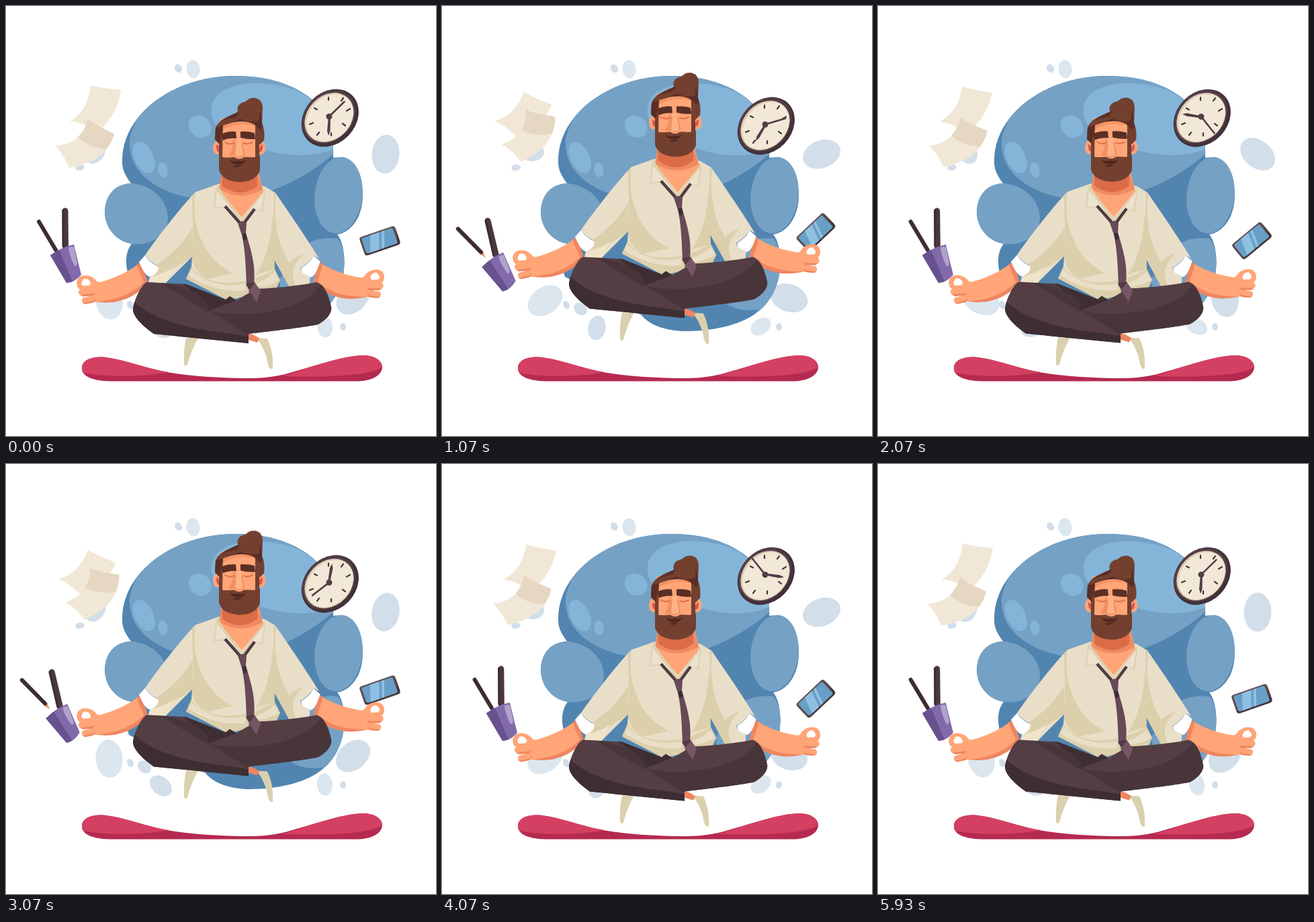
Animation of 640x640 px, one loop 6 s. Source, as an HTML page:

```html
<!DOCTYPE html>
<html lang="en">
<head>
<meta charset="utf-8">
<title>Calm at work</title>
<style>
  html, body { margin: 0; width: 100%; height: 100%; overflow: hidden; background: #fff; }
  svg { display: block; width: 100%; height: 100%; }
</style>
</head>
<body>
<svg viewBox="0 0 640 640">
  <defs>
    <clipPath id="domeClip"><path d="M173 232C172 160 250 104 342 104C400 104 445 123 470 154C483 171 488 192 487 226L440 300L200 300Z"/></clipPath>
    <path id="pants" d="M209 411C199 418 190 440 189 452C190 464 206 478 220 488L361 502L361 488C400 483 440 479 464 474C477 468 486 456 484 448C481 432 474 414 462 411C440 416 400 420 372 421L343 438L333 432L327 437L268 414Z"/>
    <clipPath id="pantsClip"><use href="#pants"/></clipPath>
    <g id="arm">
      <path fill="#ffa577" d="M201 380C188 393 163 405 140 411C130 410 125 419 130 428L128 440C150 443 182 439 210 411Z"/>
      <path fill="#ef8560" d="M201 380L195 385C197 396 203 404 205 411C191 426 168 438 134 440C160 445 192 437 211 411Z"/>
      <path fill="none" stroke="#ffa577" stroke-width="7" stroke-linecap="round" d="M132 412C128 405 118 403 112 406C107 410 108 418 114 420C121 420 127 418 131 416"/>
      <path fill="#ffa577" d="M124 404Q137 408 143 419L142 440L126 438L118 420Z"/>
      <ellipse cx="120" cy="411" rx="6.5" ry="4.500" transform="rotate(35 120 411)" fill="#fff"/>
      <g fill="none" stroke-linecap="round">
        <path stroke="#ef8560" stroke-width="9.500" d="M114 427H127M118 439L128 437"/>
        <path stroke="#ffa577" stroke-width="8" d="M112 426L128 424M117 438L128 435"/>
        <path stroke="#ef8560" stroke-width="1.300" d="M114 432Q124 431 129 429"/>
      </g>
      <path fill="#fff" d="M207 371L198 381C203 392 207 401 214 403C224 402 228 395 227 388C219 384 211 379 207 371Z"/>
    </g>
  </defs>

  <g id="bubbles"></g>

  <path fill="#5185b0" d="M173 232C172 160 250 104 342 104C400 104 445 123 470 154C483 171 488 192 487 226C516 222 531 248 531 281C531 312 516 336 493 340C502 350 505 375 503 392C500 420 486 444 470 455C450 472 410 484 362 484C335 484 308 475 297 460L200 412L183 403C177 385 177 367 187 354C164 350 147 330 147 306C148 281 162 266 186 264C178 253 173 244 173 232Z"/>
  <g clip-path="url(#domeClip)">
    <path fill="#75a1c5" d="M184 200C188 168 230 90 342 95C430 95 500 145 490 218C440 262 380 287 318 290C250 290 180 260 184 200Z"/>
    <path fill="#84b5d9" d="M306 160C302 125 345 113 378 115C420 117 450 130 464 150C480 172 487 190 487 213C460 225 420 225 385 214C340 200 309 188 306 160Z"/>
  </g>
  <g fill="#75a1c5">
    <path d="M147 306C148 281 162 264 188 264C220 268 241 290 241 317C240 340 217 358 187 354C164 350 147 330 147 306Z"/>
    <ellipse cx="495" cy="281.500" rx="35.500" ry="57" transform="rotate(6 495 281)"/>
    <path d="M446 356C460 345 480 345 493 346C502 355 505 375 503 392C501 418 488 441 473 452C430 457 405 438 408 405Z"/>
  </g>
  <g fill="#84b5d9">
    <ellipse cx="289" cy="179.500" rx="18" ry="15.500" transform="rotate(40 289 179)"/>
    <ellipse cx="205" cy="225.500" rx="14" ry="25" transform="rotate(-26 205 225)"/>
    <ellipse cx="233.500" cy="244" rx="7" ry="11" transform="rotate(-8 233 244)"/>
  </g>

  <path fill="#b52a50" d="M113 539C113 526 130 521 149 523C180 527 210 540 240 545C280 552 330 554 365 554C385 554 400 551 411 549C445 541 500 520 532 520C550 520 560 529 560 538C559 550 545 558.600 520 558.600H160C130 558.600 113 552 113 539Z"/>
  <g fill="#d44062">
    <path d="M113 539C113 526 130 521 149 523C180 527 210 540 242 545C205 552 150 553 115 546Q113 543 113 539Z"/>
    <path d="M411 551C445 541 500 520 532 520C550 520 560 529 560 537C546 549 490 553 411 551Z"/>
  </g>

  <g id="sheetA"><path fill="#f1e7d6" d="M126 118C142 122 155 123 171 125C168 150 154 172 138 187C122 180 112 172 95 172C114 160 123 144 126 118Z"/></g>
  <g id="sheetB">
    <path fill="#e6d7c2" d="M122 168C132 177 146 183 161 190Q158 203 149 214C133 212 118 206 107 195C114 188 119 180 122 168Z"/>
    <path fill="#f1e7d6" d="M73 208C90 207 99 202 107 195C118 206 133 212 149 213C137 230 118 236 94 241C89 230 83 217 73 208Z"/>
  </g>

  <g id="pencil">
    <path fill="#f29b6c" d="M72 366L79 373L77 362Z"/>
    <path stroke="#3d2d33" stroke-width="6" stroke-linecap="round" d="M49 321L74 363"/>
  </g>
  <g id="pen">
    <path stroke="#4b373d" stroke-width="9" stroke-linecap="round" d="M88 305L88.500 358"/>
    <path stroke="#3d2d33" stroke-width="3" d="M85 303V358"/>
  </g>
  <g id="cup">
    <path fill="#826aaa" d="M66 371Q82 359 101 355L112 400Q102 412 90 412Z"/>
    <path fill="#67528f" d="M66 371L79 363L99 410Q94 412 90 412Z"/>
    <path fill="#b0a3cb" d="M93 360Q97 357 101 359L106 381Q106 388 102 387Q95 374 93 360Z"/>
  </g>

  <g id="phone">
    <rect x="-28" y="-14.500" width="56" height="29" rx="4" fill="#5f4c50"/>
    <path fill="#453439" d="M-27 10Q-26 14.500 -22 14.500H23Q28 14.500 28 9V-9L25 9Q24 12 20 12Z"/>
    <path fill="#699fc6" d="M-23 -12.500H22Q24 -12.500 24 -10V10Q24 12 22 12H-22Q-25 12 -25 9V-10Q-25 -12.500 -23 -12.500Z"/>
    <path fill="#8fc0e2" d="M-11 -12.500H3L-5 12H-19ZM7 -12.500H11L3 12H-1Z"/>
  </g>

  <g id="clock">
    <g transform="rotate(-46 482 167)">
      <ellipse cx="482.500" cy="167" rx="47" ry="38" fill="#42313a"/>
      <ellipse cx="482.500" cy="164.500" rx="44" ry="35" fill="#533e46"/>
      <ellipse cx="482" cy="165.500" rx="40.500" ry="32.500" fill="#ddcdb5"/>
      <ellipse cx="482.500" cy="166.500" rx="39" ry="30.500" fill="#f2e8d7"/>
    </g>
    <path fill="none" stroke="#42313a" stroke-width="2.200" stroke-linecap="round" d="M480 136V140M502 137L499 141M512 153L507 156M501 175L505 178M484 189V193M466 188L463 192M457 174L452 176M459 152L463 154"/>
    <g id="hands" fill="#533e46">
      <path stroke="#533e46" stroke-width="2.600" stroke-linecap="round" d="M481 164.500L503.500 142.500"/>
      <path d="M480 164H483L482.500 186L480 193L478 186Z"/>
      <circle cx="481" cy="164.500" r="4.500"/>
    </g>
  </g>

  <g id="man">
    <path fill="#dad0ae" d="M268 494H286C278 508 273 522 270 534Q267 538 265 533Q264 512 268 494ZM373 494L389 495C396 510 398 525 397 540Q393 542 390 534C388 520 383 507 373 494Z"/>
    <path fill="#ef8560" d="M360 487Q370 489 377 495L374 501L361 497Z"/>

    <use href="#arm"/>
    <use href="#arm" transform="translate(666 0) scale(-1 1) rotate(5.800 205 385)"/>

    <path fill="#e9dfc9" d="M316 265L282 277C266 293 228 340 207 371Q213 381 227 387Q227 398 214 403L212 411L237 413L277 373L276 388L268 406L330 438L402 421L408 408L400 392L398 375L421 417L452 420L452 402Q439 399 438 390Q451 383 458 371L466 376C444 340 416 300 401 278L384 268Z"/>
    <path fill="#dccfab" d="M277 330C261 359 238 376 222 386L227 388Q228 398 216 403Q247 396 277 373ZM276 388C290 411 340 426 400 392L408 408L402 421L330 438L268 406ZM282 277L277 283L279 375L281 283ZM398 277C400 306 397 339 398 375L421 417L433 420C426 405 420 390 444 368Q428 374 422 382C404 355 398 318 402 280Z"/>
    <path fill="#dccfab" d="M279 290C281 340 298 378 338 398L300 406C282 397 277 385 277 372ZM398 300C396 340 388 380 371 400L400 392Z"/>
    <path fill="#e9dfc9" d="M276 392C295 412 330 420 357 413L356 423C325 427 295 417 272 402ZM372 412C386 409 393 401 400 396L407 408Q390 418 373 418Z"/>
    <path fill="#f0e4c8" d="M216 403Q238 397 249 389L238 412L212 411Z"/>

    <use href="#pants" fill="#543e43"/>
    <g clip-path="url(#pantsClip)">
      <path fill="#3e2e33" d="M186 435C212 465 265 480 330 487L363 492V505L220 492L185 460ZM268 414L327 437L333 432L343 438L300 454C294 440 280 425 262 414Z"/>
      <path fill="#47353a" d="M303 454C350 465 445 458 471 411L490 440V462L464 476L361 490Z"/>
      <path fill="#47353a" d="M230 412C285 420 305 438 302 456L270 437Z"/>
    </g>

    <path fill="#ffa577" d="M321 245H375L383 276L351 315L318 275Z"/>
    <path fill="#ef8a61" d="M317 272Q348 292 382 273L375 250H321Z"/>
    <path fill="#dc6c48" d="M321 240H374V268Q349 287 322 268Z"/>
    <path fill="#ddd1b0" d="M315 265L320 275L351 318L350 324L326 300L309 302L312 273ZM384 268L383 276L351 318L354 323L370 302L382 307L386 278Z"/>
    <path fill="#ece2cd" d="M314 275L342 310L326 298L311 300ZM384 278L360 309L369 302L380 304Z"/>
    <path fill="none" stroke="#513b42" stroke-width="4.500" d="M326 298L350 325M370 302L353 325"/>
    <path fill="#684957" d="M345 323L352 320L358 323L357 338C365 364 372 387 369 413L358 417C357 389 356 362 351 341Z"/>
    <path fill="#3f2d35" d="M351 339L357 338L359 346L354 350Z"/>
    <path fill="#765565" d="M361 419L370 411L379 424L373 441L364 428Z"/>
    <path fill="#513b45" d="M357 414L369 410L370 413L361 424L372 441Z"/>

    <ellipse cx="314" cy="211" rx="6" ry="10" fill="#ffa577"/>
    <ellipse cx="380.500" cy="211" rx="6" ry="10" fill="#ffa577"/>
    <path fill="#d95751" d="M313 206Q319 208 318 218Q312 217 313 206ZM382 206Q376 208 377 218Q383 217 382 206Z"/>
    <path fill="#ffa577" d="M319 168H374V230H319Z"/>
    <path fill="#f2905f" d="M321 177L372 171V178Q342 171 321 185ZM341 198L339 223H331Q338 215 338 199Z"/>
    <path fill="#73402f" d="M312 181Q316 169 345 158Q342 145 357 142Q362 136 372 137Q382 140 382 152L381 174Q386 186 384 200L377 207V227H371V177C357 168 337 173 323 178L322 227H317V205L311 199Z"/>
    <path fill="#5b2e25" d="M312 181L323 178L318 205L311 198ZM345 158Q362 161 368 151Q381 154 381 174Q383 183 378 184L369 176Q358 169 336 173Q352 167 357 163Q337 165 317 172Z"/>
    <path fill="#73402f" d="M354 150Q363 159 377 147V170Q363 176 343 165Z"/>
    <path fill="#5b2e25" d="M320 191Q330 186 342 187L343 197Q332 196 323 200ZM349 187Q360 186 370 189L371 198Q360 199 349 196Z"/>
    <path fill="none" stroke="#df7048" stroke-width="2" stroke-linecap="round" d="M326 203Q332 207 339 204M354 204Q360 207 367 203"/>
    <path fill="#ffb184" d="M342 197H350L354 222Q347 230 339 223Z"/>
    <path fill="none" stroke="#eb865a" stroke-width="1.500" d="M342 202L340 222Q346 228 354 222L351 203"/>
    <path fill="#73402f" d="M317 223C324 227 333 225 340 225Q347 230 354 225C362 224 370 227 378 223V245C373 258 360 262 347 262C333 261 321 257 317 244Z"/>
    <path fill="#512720" d="M333 229Q340 233 346 230Q353 233 358 228Q355 236 345 236Q336 236 333 229ZM337 238Q345 237 351 236Q347 240 342 240Z"/>
  </g>
</svg>
<script>
const LOOP = 6000, STEP = LOOP / 84;
const $ = id => document.getElementById(id);
const pose = (id, value) => $(id).setAttribute("transform", value);

// x, y, half width, half height, start angle, shade, spins
const bubbleData = [
  [256.5, 93, 5, 6.5, -30, 1, 0], [278.5, 94, 10, 13.5, -5, 0, 0],
  [110, 240.5, 7, 4.5, -10, 1, 0], [133, 217, 14, 19, 30, 1, 1],
  [565, 220.5, 20.5, 29, 5, 1, 1], [153.5, 438.5, 20, 28.5, -9, 0, 1],
  [185, 445, 4.5, 6.5, -25, 1, 0], [206, 451, 8.5, 11, -50, 1, 0],
  [230.5, 479, 13, 18.5, -54, 1, 1], [516.5, 434.5, 20.5, 28.5, 46, 1, 1],
  [474.5, 477, 11.5, 16.5, -9, 0, 1], [501.5, 477.5, 4.5, 5.5, 0, 1, 0]
];
const bubbles = bubbleData.map(([x, y, rx, ry, angle, shade, spins]) => {
  const el = document.createElementNS("http://www.w3.org/2000/svg", "ellipse");
  el.setAttribute("rx", rx);
  el.setAttribute("ry", ry);
  el.setAttribute("fill", shade ? "#d2deea" : "#dce6ee");
  $("bubbles").append(el);
  return turn => el.setAttribute("transform", `translate(${x} ${y}) rotate(${angle + turn * spins})`);
});

const ease = p => (1 - Math.cos(Math.PI * p)) / 2;

// One value per second, eased in between.
function track(values, t) {
  const i = Math.floor(t / 1000);
  return values[i] + (values[i + 1] - values[i]) * ease(t / 1000 - i);
}

const BOB = [0, 1, 0, 1, 0, 1, 0];
const FLUTTER = [0, 1, 0.17, 1, 0.17, 1, 0];
const DIP = [0, 10, 0, 0, 0, 0, 0];

function draw(t) {
  const bob = track(BOB, t);
  const flutter = track(FLUTTER, t);
  const dip = track(DIP, t);
  const drift = (id, dx, dy, angle, x, y, k, extra = 0) =>
    pose(id, `translate(${dx * k} ${dy * k + extra}) rotate(${angle * k} ${x} ${y})`);

  bubbles.forEach(spin => spin(360 * t / LOOP));
  pose("man", `translate(0 ${-38 * bob})`);
  pose("clock", `translate(0 ${12 * bob})`);
  pose("hands", `rotate(${360 * ease(t / LOOP)} 481 164.5)`);
  drift("sheetA", -4, 10, 16, 126, 118, flutter);
  drift("sheetB", 3, -14, -16, 122, 168, flutter);
  drift("pencil", -26, 1, -14, 48, 319, bob, dip);
  drift("pen", -21, 5, -13, 88, 301, bob, dip);
  drift("cup", -8.5, 5, -10, 83, 362, bob, dip);
  pose("phone", `translate(556.5 ${349.5 - 13 * bob}) rotate(${-19 - 30 * ease(t / 1500)})`);
}

const start = performance.now();
function tick(now) {
  const t = Math.max(0, now - start) % LOOP;
  draw(Math.floor((t + 5) / STEP) % 84 * STEP);
  requestAnimationFrame(tick);
}
draw(0);
requestAnimationFrame(tick);
</script>
</body>
</html>
```
